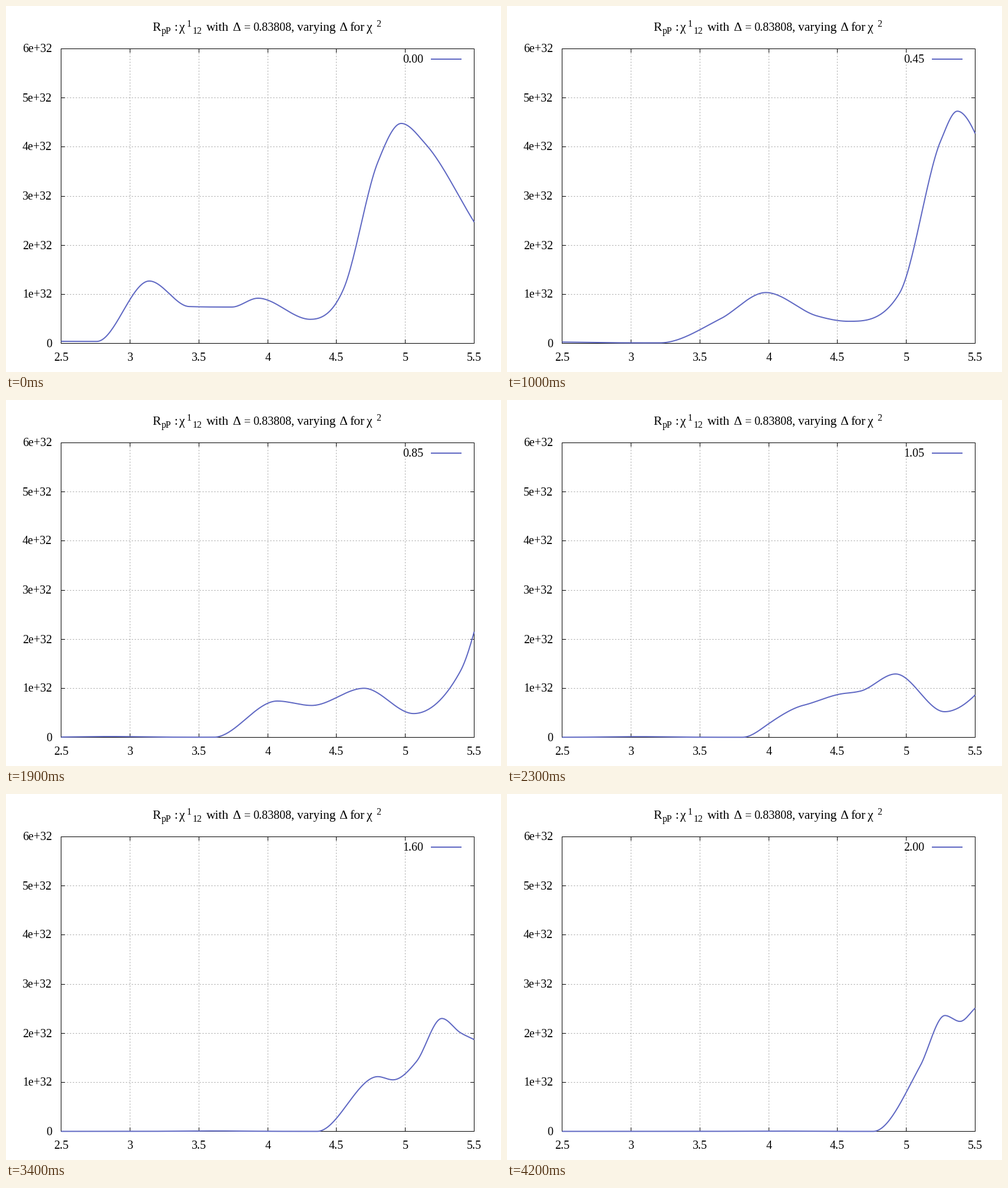
Recreate the animation shown at these times as a matplotlib script. Size 840 by 620 pixels, loop 4300 ms.

```python
import numpy as np
import matplotlib.pyplot as plt
from matplotlib.animation import FuncAnimation

W, H, DPI = 840, 620, 100
PX = 72 / DPI
LEFT, RIGHT, TOP, BOTTOM = 93.5, 794.5, 72.5, 571.5
BLUE, GREY = "#5f68c3", "#a0a0a0"
TICK = 6.5

# Even steps of 0.05 plus the first mass gap and half of it
GAP = 0.83808
DELTAS = sorted([0.05 * i for i in range(41)] + [GAP / 2, GAP])


def onset(delta):
    return 2.76 + delta


class Key:
    """Smooth curve through the onset and a few named features."""

    def __init__(self, delta, **features):
        self.delta = delta
        self.features = dict(onset=(onset(delta), 0.04 * np.exp(-3 * delta)),
                             **features)
        self.x, self.y = np.array(list(self.features.values())).T
        h = np.diff(self.x)
        s = np.diff(self.y) / h
        mean = (s[:-1] * h[1:] + s[1:] * h[:-1]) / (h[1:] + h[:-1])
        limit = 3 * np.minimum(abs(s[:-1]), abs(s[1:]))
        inner = np.where(s[:-1] * s[1:] > 0, np.clip(mean, -limit, limit), 0)
        self.slope = np.concatenate([[0], inner, s[-1:]])

    def __call__(self, x):
        x = np.clip(x, self.x[0], self.x[-1])
        i = np.clip(np.searchsorted(self.x, x) - 1, 0, len(self.x) - 2)
        h = self.x[i + 1] - self.x[i]
        u = (x - self.x[i]) / h
        return (self.y[i] + (self.y[i + 1] - self.y[i]) * u * u * (3 - 2 * u)
                + h * u * (1 - u) * (self.slope[i] * (1 - u)
                                     - self.slope[i + 1] * u))


KEYS = [
    Key(0.00, first=(3.14, 1.27), dip=(3.43, .75), notch=(3.74, .74),
        second=(3.93, .92), valley=(4.31, .49), foot=(4.55, 1.1),
        flank=(4.8, 3.69), peak=(4.97, 4.48), fall=(5.15, 4.05),
        tail=(5.5, 2.47)),
    Key(0.20, first=(3.32, .89), dip=(3.52, .655), notch=(3.77, .71),
        second=(4.01, .97), valley=(4.45, .43), foot=(4.7, .99),
        flank=(5.08, 4.45), peak=(5.185, 5.33), fall=(5.35, 3.65),
        tail=(5.6, 2.55)),
    Key(0.45, first=(3.65, .5), second=(3.98, 1.035), dent=(4.35, .56),
        valley=(4.58, .45), foot=(4.95, 1.02), flank=(5.25, 4.13),
        peak=(5.37, 4.73), tail=(5.7, 2.9)),
    Key(0.85, second=(4.07, .74), dent=(4.32, .65), third=(4.7, 1.0),
        valley=(5.06, .485), foot=(5.4, 1.35), peak=(5.78, 4.4),
        tail=(6.1, 3.2)),
    Key(1.30, rise=(4.25, .275), second=(4.5, .56), hump=(4.82, 1.2),
        saddle=(4.93, 1.18), third=(5.2, 1.655), valley=(5.55, .57),
        foot=(5.95, 1.3)),
    Key(1.60, hump=(4.8, 1.115), saddle=(4.91, 1.05), climb=(5.08, 1.42),
        third=(5.265, 2.3), fall=(5.4, 2.01), tail=(5.5, 1.87)),
    Key(2.00, climb=(5.1, 1.33), third=(5.28, 2.36), fall=(5.39, 2.24),
        tail=(5.5, 2.51)),
]


def curve(x, delta):
    """Blend two keys while their shared features slide into each other."""
    a, b = next((a, b) for a, b in zip(KEYS, KEYS[1:])
                if delta <= b.delta + 1e-9)
    t = (delta - a.delta) / (b.delta - a.delta)
    shared = [name for name in a.features if name in b.features]
    fa, fb = (np.array([k.features[name][0] for name in shared])
              for k in (a, b))
    now = (1 - t) * fa + t * fb
    ya = a(x + np.interp(x, now, fa - now))
    yb = b(x + np.interp(x, now, fb - now))
    ripple = np.exp(-((x - onset(delta) + 0.75) / 0.3) ** 2)
    return (1 - t) * ya + t * yb + 0.02 * (1 - delta / 2.8) * ripple


def px(x):
    return LEFT + (x - 2.5) / 3 * (RIGHT - LEFT)


def py(y):
    return BOTTOM - y / 6 * (BOTTOM - TOP)


def pixel(v):
    return np.floor(v) + 0.5


fig = plt.figure(figsize=(W / DPI, H / DPI), dpi=DPI, facecolor="white")
ax = fig.add_axes([0, 0, 1, 1])
ax.set_xlim(0, W)
ax.set_ylim(H, 0)
ax.axis("off")


def line(xs, ys, color="black", width=1, **kw):
    style = dict(solid_capstyle="butt", dash_capstyle="butt", snap=False)
    return ax.plot(xs, ys, color=color, lw=width * PX, **style, **kw)[0]


def text(x, y, s, size=20, ha="left"):
    return ax.text(x, y, s, fontsize=size * PX, ha=ha, va="baseline",
                   family="Liberation Serif", color="black")


DOTS = dict(color=GREY, linestyle=(0, (2, 3)))

for k in range(7):
    x, y = pixel(px(2.5 + k / 2)), pixel(py(k))
    if 0 < k < 6:
        # the grid leaves room for the legend
        line([x, x], [BOTTOM, 99 if k == 5 else TOP], **DOTS)
        line([LEFT, RIGHT], [y, y], **DOTS)
    for start, step in ((BOTTOM, -TICK), (TOP, TICK)):
        line([x, x], [start, start + step])
    for start, step in ((LEFT, TICK), (RIGHT, -TICK)):
        line([start, start + step], [y, y])
    text(x, 601, f"{2.5 + k / 2:g}", ha="center")
    text(78, y + 6, f"{k}e+32" if k else "0", ha="right")

line([LEFT, RIGHT, RIGHT, LEFT, LEFT], [TOP, TOP, BOTTOM, BOTTOM, TOP],
     solid_joinstyle="miter")

for x, word in ((248, "R"), (285, ":"), (294, "χ"), (340, "with"), (384, "Δ"),
                (404, "="), (419, "0.83808,"), (494, "varying"), (565, "Δ"),
                (583, "for"), (612, "χ")):
    text(x, 42, word, 21.5 if word.isalpha() else 20)
for x, y, word in ((264, 47, "pP"), (307, 35, "1"), (317, 47, "12"),
                   (628, 35, "2")):
    text(x, y, word, 16)

line([721, 773], [90, 90], BLUE, 2)
label = text(708, 96, "", ha="right")

grid_x = np.linspace(2.5, 5.5, 301)
plot = line([], [], BLUE, 2, solid_joinstyle="round")


def draw(i):
    delta = DELTAS[i]
    plot.set_data(px(grid_x), py(curve(grid_x, delta)))
    label.set_text(f"{delta:.2f}")
    return plot, label


anim = FuncAnimation(fig, draw, frames=len(DELTAS), interval=100,
                     repeat=True, repeat_delay=0, blit=False)
plt.show()
```
